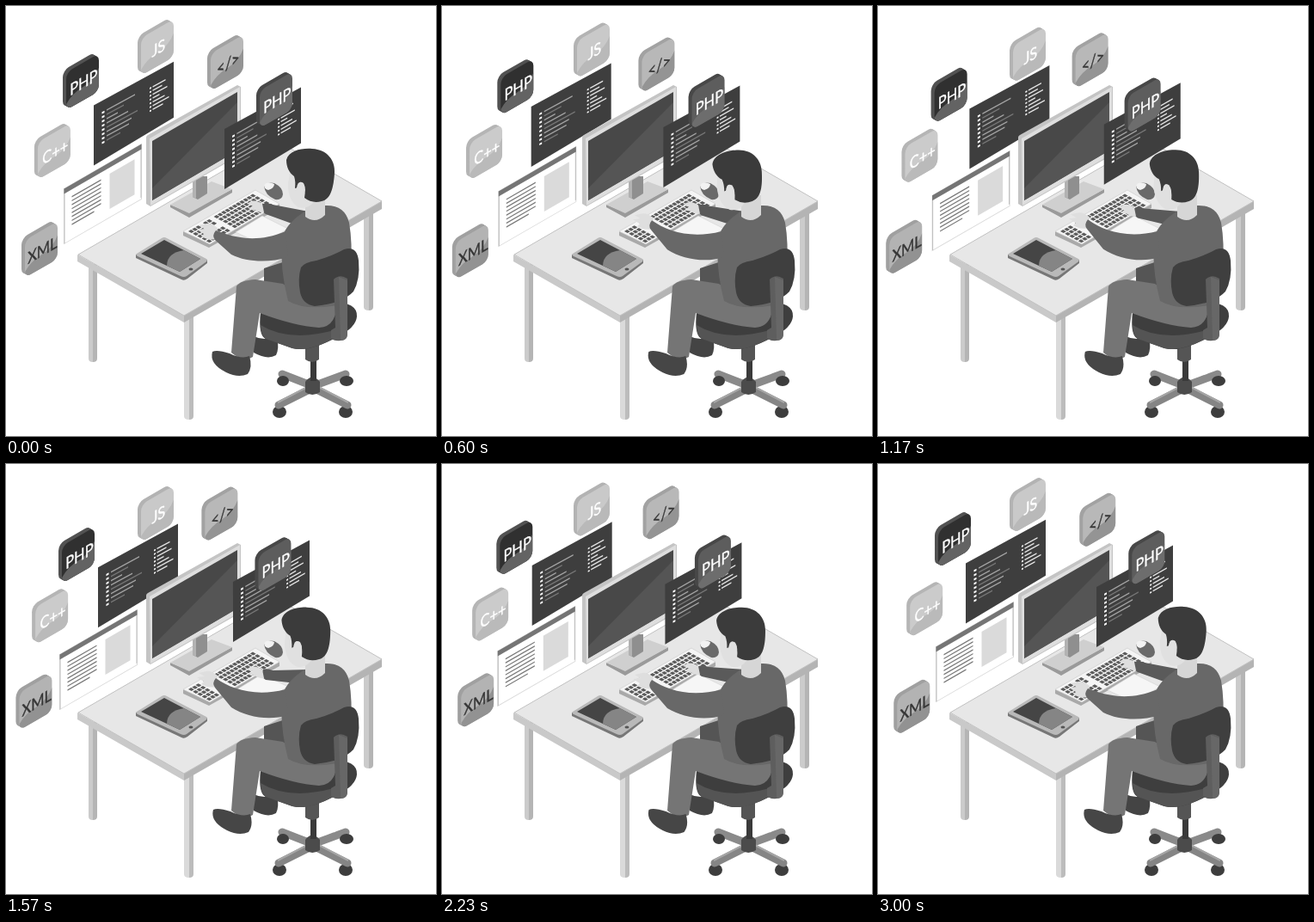
Animation, 500 px wide and 500 px high, one loop 3.03 s. Source, as an HTML page:

```html
<!DOCTYPE html>
<html lang="en">
<head>
<meta charset="utf-8">
<title>Isometric developer at a desk</title>
<style>
html, body { margin: 0; width: 100%; height: 100%; overflow: hidden; background: #fff; }
svg { display: block; width: 100vw; height: 100vh; }
text { font: 19px Lato, "Open Sans", sans-serif; text-anchor: middle; }
</style>
</head>
<body>
<svg viewBox="0 0 500 500">
  <defs>
    <clipPath id="face"><rect width="43.9" height="43.9" rx="8"/></clipPath>
  </defs>

  <g id="panelA"></g>
  <g id="page"></g>

  <g id="desk">
    <path fill="#cbcbcb" d="M96 300h5v114q-5 0-5-4zM416 238h6v116q-6 0-6-4z"/>
    <path fill="#b5b5b5" d="M101 300h5v110q0 4-5 4zM422 238h5v112q0 4-5 4z"/>
    <path fill="#dadada" d="M207 360h6v121q-6 0-6-4z"/>
    <path fill="#bcbcbc" d="M213 360h5v117q0 4-5 4z"/>
    <path fill="#c9c9c9" d="M83 289L207 359V368L83 297Z"/>
    <path fill="#b4b4b4" d="M207 359L437 226V236L207 368Z"/>
    <path fill="#e7e7e7" stroke="#c2c2c2" stroke-width="1" d="M84 289L314 156L437 227L207 360Z"/>
  </g>

  <g id="monitor">
    <path fill="#9a9a9a" d="M191 234L213 246L263 217V213L213 240L191 231Z"/>
    <path fill="#cfcfcf" d="M191 231L239 204L263 213L213 241Z"/>
    <path fill="#8f8f8f" d="M217 198H234V218L223 225L217 222Z"/>
    <path fill="#b2b2b2" d="M217 198H221V224L217 222Z"/>
    <path fill="#c4c4c4" d="M163 153Q163 151 165 150L269 92L273 94V171Q273 173 271 174L168 233L163 230Z"/>
    <path fill="#dedede" d="M167 154L272 94V172L168 232Z"/>
    <path fill="#484848" d="M170 157L269 100V168L170 226Z"/>
    <path fill="#555" d="M170 212L269 112V168L170 226Z"/>
  </g>

  <g id="tablet">
    <path fill="#777" d="M151 289V293L204 318Q207 320 211 317L234 299V295Z"/>
    <path fill="#b9b9b9" d="M152 288L181 270Q184 268 187 270L233 294Q235 296 232 298L210 314Q207 316 203 314L153 291Q150 289 152 288Z"/>
    <path fill="#454545" d="M157 288L184 272L226 294L202 309Z"/>
    <path fill="#858585" d="M187 302Q187 287 207 284L226 294L202 309Z"/>
    <ellipse cx="215" cy="306" rx="2.5" ry="1.5" fill="#555"/>
  </g>

  <g id="keyboard">
    <path fill="#a9a9a9" d="M206 262V267L236 281L318 235V230L236 274Z"/>
    <path fill="#f5f5f5" stroke="#cfcfcf" stroke-width=".7" d="M206 262L290 214L318 230L237 277Z"/>
    <path id="keys" fill="#5b5b5b"/>
  </g>
  <path fill="#f6f6f6" stroke="#d2d2d2" stroke-width=".6" d="M267 263L298 244L328 259L297 277Z"/>
  <g id="mouse">
    <path fill="#6a6a6a" d="M300 209Q304 204 312 206Q322 211 322 219Q321 226 313 225Q301 220 300 209Z"/>
    <path fill="#f2f2f2" d="M300 208Q304 203 312 207Q312 212 305 214Q300 213 300 208Z"/>
  </g>

  <g id="panelB"></g>

  <g id="chairBase">
    <g stroke-linecap="round" stroke="#8a8a8a" stroke-width="9">
      <path d="M357 442L321 428M357 442L395 428"/>
    </g>
    <g fill="#3d3d3d">
      <ellipse cx="322" cy="436" rx="7" ry="6"/><ellipse cx="396" cy="436" rx="8" ry="6"/>
      <ellipse cx="318" cy="472" rx="8" ry="7"/><ellipse cx="395" cy="472" rx="8" ry="7"/>
    </g>
    <g stroke-linecap="round" stroke="#858585" stroke-width="9">
      <path d="M357 444L317 464M357 444L397 464"/>
    </g>
    <path fill="none" stroke="#a6a6a6" stroke-width="2" d="M356 440L316 461M358 440L398 461"/>
    <path fill="#4b4b4b" d="M348 437Q356 426 365 437V449Q356 455 348 449Z"/>
    <path fill="#3a3a3a" d="M354 412H361V436H354Z"/>
    <path fill="#555" d="M348 388H364V411Q356 417 348 411Z"/>
  </g>

  <path fill="#444" d="M288 384Q300 390 315 384Q318 398 314 406Q304 412 288 403Z"/>
  <path fill="#555" d="M300 305L328 296V335L300 326Z"/>
  <path fill="#3e3e3e" d="M296 356Q320 340 370 345Q409 342 408 361Q407 374 385 385Q352 403 333 398L302 387Q293 383 296 356Z"/>
  <path fill="#545454" d="M296 371Q330 392 385 376L384 385Q352 403 333 398L302 387Q296 382 296 371Z"/>
  <path fill="#757575" d="M268 326Q272 319 290 318L322 323L340 336L385 340Q386 373 364 374Q335 372 295 357L287 408Q276 415 262 403Z"/>
  <path id="shoe" fill="#464646" d="M240 402Q245 399 260 404Q274 411 283 407Q287 420 281 428Q270 433 256 426Q236 416 240 402Z"/>

  <path id="farArm" fill="#5a5a5a"/>
  <path id="farHand" fill="#dedede" d="M-1-5Q-8-10-14-8L-19-5L-12-3L-17 1L-10 2Q-5 6 1 5Z"/>
  <path fill="#686868" d="M349 238Q360 246 371 232Q394 231 399 252Q403 275 401 305L396 346Q350 356 328 343Q318 305 321 269Q327 251 349 238Z"/>
  <path id="nearHand" fill="#dedede" d="M3-9Q-5-15-10-14L-19-12L-12-8L-21-7L-13-2L-16 1Q-7 6 1 4Z"/>
  <path id="nearArm" fill="#686868"/>

  <path fill="#3f3f3f" d="M343 304Q347 298 361 296Q381 290 393 283Q408 278 410 296Q412 318 404 332Q391 346 359 349Q345 347 342 333Q339 317 343 304Z"/>
  <path fill="#5e5e5e" d="M381 318Q388 311 397 317V383Q396 389 389 389Q381 390 378 386V377L383 374Z"/>
  <path fill="#747474" d="M387 315L397 319V384Q394 389 389 388Z" opacity=".45"/>

  <path fill="#d6d6d6" d="M348 222L371 220V243Q360 254 348 245Z"/>
  <g id="head">
    <path fill="#e0e0e0" d="M331 188L328 207Q328 227 340 234Q350 237 358 228L361 200Z"/>
    <path fill="#3b3b3b" d="M326 179C329 168 344 165 356 166C374 167 383 180 382 194C381 210 378 225 367 227Q356 230 347 223Q349 213 346 207Q340 201 339 211L336 212Q337 204 335 198C329 194 326 187 326 179Z"/>
    <path fill="#e0e0e0" d="M338 211Q340 202 346 206Q350 214 345 220Q339 220 338 211Z"/>
  </g>
  <g id="icons"></g>
</svg>
<script>
const LOOP = 3030, STEP = LOOP / 91;
const $ = id => document.getElementById(id);

// Code window drawn on a skewed plane
const codePanel = w => {
  const line = (x, y, len, col, h = 1.5) => `<rect x="${x}" y="${y}" width="${len}" height="${h}" fill="${col}"/>`;
  let s = '';
  [33, 20, 13, 25, 36, 29, 26, 16].forEach((len, i) => {
    const y = 13 + i * 5;
    s += line(9.5, y, 3, '#fff', 2.2) + line(15, y, len, i % 3 == 1 ? '#777' : '#a5a5a5');
  });
  [15, 11, 17, 8, 14, 19, 12].forEach((len, i) => {
    const y = 15 + i * 4.4;
    s += line(65, y, 2, '#fff', 1.8) + line(68.5, y, len, '#e8e8e8');
  });
  return `<path fill="#3e3e3e" d="M0 0L${w} ${-w * .545}V${15 - w * .545 + 50}L0 70Z"/>
    <g transform="matrix(${w / 93},-.545,0,1,0,0)">${s}</g>`;
};
$('panelA').innerHTML = codePanel(93);
$('panelB').innerHTML = codePanel(89);

let rows = '';
for (let i = 0; i < 8; i++) rows += `<path d="M9 ${14.5 + i * 4.6}h${i == 7 ? 26 : 34}"/>`;
$('page').innerHTML = `<g transform="matrix(1,-.577,0,1,0,0)">
  <rect width="90" height="64" fill="#fff" stroke="#dcdcdc"/>
  <path d="M.5 0V64M89.5 0V62" stroke="#bbb"/>
  <rect width="90" height="6" fill="#757575"/>
  <g stroke="#777" stroke-width="1.4">${rows}</g>
  <rect x="53" y="13" width="29" height="41" fill="#dadada"/></g>`;

// Keys: number block, arrows, main block
let keys = '';
for (let r = 0; r < 5; r++) for (let c = 0; c < 18; c++) {
  if (c == 3 || c == 6 || (c > 3 && c < 6 && r == 2)) continue;
  const u = c / 18, v = r / 5;
  keys += `M${212 + u * 76 + v * 26} ${262 - u * 44 + v * 14}l3.2-1.9 3.7 2.1-3.2 1.9z`;
}
$('keys').setAttribute('d', keys);

// label, face, lower sheen, edge, text colour, then x and y as [middle, cos, sin]
const icons = [
  ['JS', '#c9c9c9', '#b9b9b9', '#b3b3b3', '#fff', [153, 0, 0], [22, -5, 0]],
  ['PHP', '#303030', '#636363', '#525252', '#fff', [63.5, 2.5, 0], [66, -9, 0]],
  ['C++', '#cbcbcb', '#bababa', '#b5b5b5', '#fff', [31.3, 1.6, -4], [142, -4, -2]],
  ['XML', '#b3b3b3', '#929292', '#a0a0a0', '#353535', [14.5, 3.5, -4], [249, 3, 4.5]],
  ['</>', '#b8b8b8', '#949494', '#a2a2a2', '#353535', [230.5, 3.5, -3.4], [31.5, 3.5, 5]],
  ['PHP', '#5d5d5d', '#6d6d6d', '#484848', '#fff', [290, 1, -4], [82, -4, -1]]
];
const esc = s => s.replace(/</g, '&lt;').replace(/>/g, '&gt;');
const tile = (x, y, fill) =>
  `<rect transform="matrix(.866,-.5,0,1,${x},${y})" width="43.9" height="43.9" rx="8" fill="${fill}"/>`;
$('icons').innerHTML = icons.map(([label, face, low, edge, ink]) => `<g>
  ${[0, 1, 2, 3].map(i => tile(i, 18 + i * .55, edge)).join('')}
  ${tile(4, 20.2, face)}
  <g transform="matrix(.866,-.5,0,1,4,20.2)">
    <path clip-path="url(#face)" fill="${low}" d="M0 37Q8 28 24 28Q38 27 44 16V44H0Z"/>
    <text x="23.5" y="30" fill="${ink}" stroke="${ink}" stroke-width=".4">${esc(label)}</text>
  </g></g>`).join('');
const iconEls = [...$('icons').children];

// Smooth curve through keyed poses, flat at turning points
const times = [0, 370, 830, 1570, 2230, 2630, LOOP];
const track = vals => {
  const n = times.length;
  const slope = i => (vals[i + 1] - vals[i]) / (times[i + 1] - times[i]);
  const tan = vals.map((_, i) => {
    if (!i || i == n - 1) return 0;
    const a = slope(i - 1), b = slope(i);
    return a * b <= 0 ? 0 : 2 * a * b / (a + b);
  });
  return t => {
    let i = 0;
    while (i < n - 2 && t >= times[i + 1]) i++;
    const h = times[i + 1] - times[i], p = (t - times[i]) / h, q = 1 - p;
    return vals[i] * (1 + 2 * p) * q * q + tan[i] * h * p * q * q +
      vals[i + 1] * p * p * (3 - 2 * p) - tan[i + 1] * h * p * p * q;
  };
};
const nod = track([0, .55, 1, .4, .5, 1, 0]);
const lift = track([0, 9, 13, 12, 10, 1, 0]);
const farY = track([235, 237, 236, 244, 240, 236, 235]);

const move = (el, x, y) => el.setAttribute('transform', `translate(${x},${y})`);

function draw(t) {
  const a = 2 * Math.PI * t / LOOP, c = Math.cos(a), s = Math.sin(a), k = (1 - c) / 2;
  const orbit = ([m, p, q]) => m + p * c + q * s;
  icons.forEach((d, i) => move(iconEls[i], orbit(d[5]), orbit(d[6])));
  move($('panelA'), 102 + 5 * k, 115.5 + 4.7 * k);
  move($('panelB'), 254 + 10 * k, 143 - 6 * k);
  move($('page'), 67.5 - 5 * k, 212.5 + 9 * k);
  move($('shoe'), k, 0);

  const n = nod(t);
  $('head').setAttribute('transform', `translate(${-5.5 * n},${n}) rotate(${-8 * n},358,240)`);

  const u = lift(t), y = 267 - u;
  $('nearArm').setAttribute('d',
    `M244 ${y - 6}C262 ${268 - u * .5} 290 ${277 - u * .5} 325 262L328 292` +
    `C306 299 280 ${298 - u * .3} 262 ${289 - u * .5}L243 ${y + 5}Q239 ${y} 244 ${y - 6}Z`);
  move($('nearHand'), 243, y);

  const f = farY(t);
  $('farArm').setAttribute('d',
    `M299 ${f - 5}Q303 ${f - 7} 310 ${f - 4}L352 239L338 255L302 ${f + 7}Q295 ${f + 3} 299 ${f - 5}Z`);
  move($('farHand'), 299, f);
}

const start = performance.now();
function tick() {
  const t = (performance.now() - start) % LOOP;
  draw(Math.floor(t / STEP) * STEP);
  requestAnimationFrame(tick);
}
tick();
</script>
</body>
</html>
```
